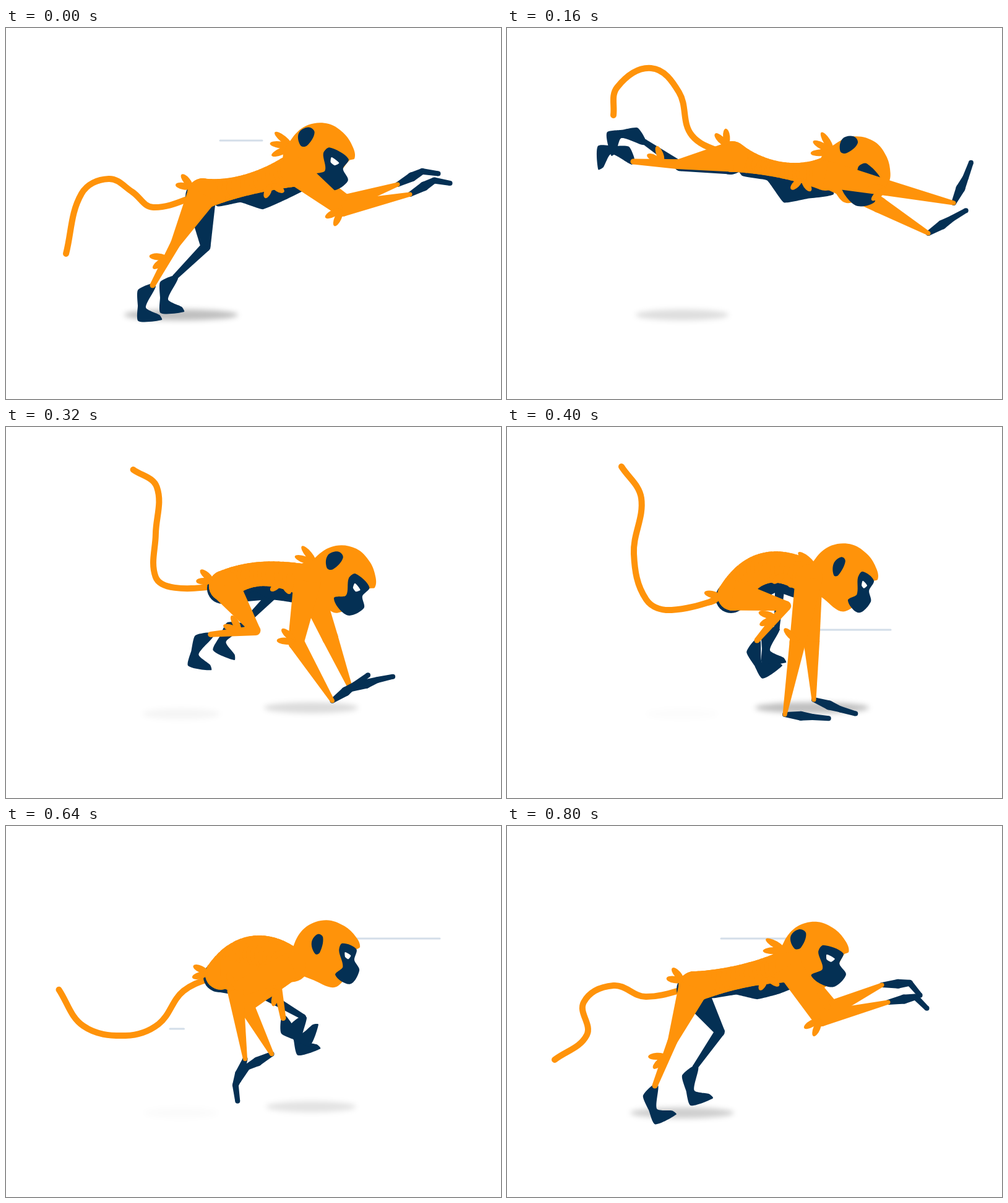
An HTML page with a canvas that plays this animation: 800x600 px, repeating every 0.84 s.

```html
<!DOCTYPE html>
<html lang="en">
<head>
<meta charset="utf-8">
<title>Running monkey</title>
<style>
html, body { margin: 0; width: 100%; height: 100%; overflow: hidden; background: #fff; }
canvas { display: block; }
</style>
</head>
<body>
<canvas id="stage" width="800" height="600"></canvas>
<script>
const ctx = document.getElementById('stage').getContext('2d');
const ORANGE = '#ff930a', NAVY = '#043054', LINE = '#d3dee9';
const LOOP = 840, STEP = 40, RAD = Math.PI / 180;

// Key poses of the rig, one row for each of these times.
const TIMES = [0, 160, 240, 400, 560, 720, 800];
const KEYS = {
  // hip, middle of the back and its radius, chest
  spine: [
    [318,268, 388,254,17, 465,230], [364,208, 440,229,13, 515,236],
    [345,232, 412,243,15, 490,250], [365,272, 418,228,25, 488,244],
    [380,238, 425,207,36, 485,225], [308,248, 375,216,22, 440,228],
    [302,260, 380,243,19, 455,226]],
  // centre, tilt, width of the visible face
  head: [
    [512,194,18,1.12], [573,218,37,1.2], [553,231,39,1.26], [548,229,18.6,.7],
    [543,197,5.6,.6], [493,192,3,.95], [499,195,8.4,1.08]],
  // wrist, palm angle, finger angle
  nearArm: [
    [653,269,-30,10], [722,283,-65,-70], [619,391,-62,-70], [449,465,5,5],
    [359,397,140,100], [456,352,50,50], [616,285,-11,45]],
  farArm: [
    [633,253,-28,8], [681,332,-32,-30], [624,390,-45,-32], [496,441,20,16],
    [419,395,139,95], [474,333,128,128], [606,257,-4,50]],
  // ankle, foot angle
  nearLeg: [
    [237,416,0], [204,216,92], [252,302,65], [404,345,-30],
    [475,284,-40], [384,358,-80], [239,420,-22]],
  farLeg: [
    [273,403,0], [222,184,82], [314,291,58], [436,325,0],
    [486,280,-30], [444,353,5], [304,390,-15]],
  // from the tip towards the hip
  tail: [
    [97,365, 122,268, 166,244, 204,265, 238,290],
    [172,141, 178,96, 233,65, 278,104, 299,174],
    [214,103, 254,100, 278,140, 270,192, 291,214],
    [185,64, 217,115, 205,205, 225,279, 266,296],
    [134,233, 174,292, 234,314, 292,317, 340,298],
    [45,292, 85,335, 142,342, 186,310, 220,239],
    [77,378, 129,338, 124,285, 172,258, 224,276]],
  // opacity of the rear and front shadow
  shade: [[.25,0], [.13,0], [.08,0], [.01,.25], [0,.16], [.06,.06], [.19,0]]
};

// Rigid shapes in their own coordinates.
const SKULL = [-52,0, -34,-28, -3,-40, 27,-32, 47,-15, 54,0, 47,6, 22,65, -18,58, -55,38];
const FACE = [9,8, 15,-4, 46,4, 43,22, 55,38, 37,61, 4,48, 19,34];
const EYE = [22,10, 35,15, 30,21, 23,18];
const EAR = [-13,-2, -1,-16, 11,-11, 6,13, -4,16];
const FOOT = [-24,8, -4,-2, 5,2, -11,36, 11,48, 15,56, -23,58, -24,33];

// Smooth looping interpolation between the key poses.
function pose(rows, t) {
  const n = TIMES.length;
  const at = i => TIMES[(i + n) % n] + LOOP * Math.floor(i / n);
  const row = i => rows[(i + n) % n];
  let i = n - 1;
  while (TIMES[i] > t) i--;
  const h = at(i + 1) - at(i), u = (t - at(i)) / h;
  return row(i).map((a, k) => {
    const b = row(i + 1)[k], d = b - a;
    const ma = (b - row(i - 1)[k]) / (at(i + 1) - at(i - 1)) * h;
    const mb = (row(i + 2)[k] - a) / (at(i + 2) - at(i)) * h;
    return a + u * (ma + u * (3 * d - 2 * ma - mb + u * (ma + mb - 2 * d)));
  });
}

const polar = ([x, y], deg, len) =>
  [x + Math.cos(deg * RAD) * len, y + Math.sin(deg * RAD) * len];
const angle = (a, b) => Math.atan2(b[1] - a[1], b[0] - a[0]) / RAD;
const mix = (a, b, u) => a.map((v, i) => v + (b[i] - v) * u);

// Curve through the points.
function trace(xy, smooth, closed) {
  const n = xy.length / 2;
  const pt = i => {
    i = closed ? (i + n) % n : Math.min(n - 1, Math.max(0, i));
    return [xy[2 * i], xy[2 * i + 1]];
  };
  ctx.beginPath();
  ctx.moveTo(...pt(0));
  for (let i = 0; i < (closed ? n : n - 1); i++) {
    const a = pt(i), b = pt(i + 1);
    const k = Math.hypot(b[0] - a[0], b[1] - a[1]) * smooth * .36;
    ctx.bezierCurveTo(...polar(a, angle(pt(i - 1), b), k),
      ...polar(b, angle(a, pt(i + 2)), -k), ...b);
  }
}

function shape(xy, color, smooth) {
  trace(xy, smooth, true);
  ctx.fillStyle = color;
  ctx.fill();
}

// Tapered strokes through [x, y, radius] points.
function chain(points, color) {
  ctx.fillStyle = color;
  points.forEach((p, i) => {
    ctx.beginPath();
    ctx.arc(...p, 0, 2 * Math.PI);
    ctx.fill();
    if (!i) return;
    const q = points[i - 1], side = angle(q, p) + 90;
    ctx.beginPath();
    ctx.moveTo(...polar(q, side, q[2]));
    ctx.lineTo(...polar(p, side, p[2]));
    ctx.lineTo(...polar(p, side, -p[2]));
    ctx.lineTo(...polar(q, side, -q[2]));
    ctx.fill();
  });
}

// Elbow or knee between two ends; side picks the bend.
function joint(a, b, upper, lower, side) {
  const d = Math.hypot(b[0] - a[0], b[1] - a[1]);
  if (d >= upper + lower) return mix(a, b, upper / (upper + lower));
  const along = (upper * upper - lower * lower + d * d) / (2 * d);
  const off = Math.sqrt(Math.max(0, upper * upper - along * along));
  return polar(polar(a, angle(a, b), along), angle(a, b) + 90 * side, off);
}

function tuft(base, deg, leaves, spread, len) {
  ctx.fillStyle = ORANGE;
  for (let i = 0; i < leaves; i++) {
    const a = deg + spread * (1 - 2 * i / (leaves - 1));
    ctx.beginPath();
    ctx.ellipse(...polar(base, a, len * .53), len * .47, 5.6, a * RAD, 0, 2 * Math.PI);
    ctx.fill();
  }
}

function arm(chest, key, upper, lower) {
  const wrist = key.slice(0, 2), [palm, finger] = key.slice(2);
  const elbow = joint(chest, wrist, upper, lower, 1);
  const knuckle = polar(wrist, palm, 45);
  chain([[...wrist, 4], [...polar(wrist, palm, 26), 7.5], [...knuckle, 5],
    [...polar(knuckle, finger, 26), 4]], NAVY);
  chain([[...chest, 22], [...elbow, 13], [...wrist, 3.5]], ORANGE);
  return angle(elbow, wrist) + 145 && { elbow, wrist };
}

function leg(hip, key, upper, lower, color) {
  const ankle = key.slice(0, 2);
  const knee = joint(hip, ankle, upper, lower, -1);
  ctx.save();
  ctx.translate(...ankle);
  ctx.rotate(key[2] * RAD);
  shape(FOOT, NAVY, .5);
  ctx.restore();
  chain([[...hip, 25], [...knee, 8], [...ankle, 4.5]], color);
  return { knee, ankle };
}

function drawHead([x, y, tilt, turn]) {
  const swing = xy => xy.map((v, i) => i % 2 ? v : 55 - (55 - v) * turn);
  ctx.save();
  ctx.translate(x, y);
  ctx.rotate(tilt * RAD);
  tuft([-47, 13], 170, 3, 31, 37);
  shape(SKULL, ORANGE, .95);
  shape(swing(FACE), NAVY, .75);
  shape(swing(EYE), '#fff', .4);
  ctx.translate(19 - 45 * turn, 16 - 22 * turn);
  ctx.scale(Math.min(1, turn), 1);
  shape(EAR, NAVY, .9);
  ctx.restore();
}

function shadow(alpha, x, y) {
  if (alpha < .004) return;
  ctx.save();
  ctx.filter = 'blur(4px)';
  ctx.fillStyle = `rgba(0,0,0,${alpha})`;
  ctx.beginPath();
  ctx.ellipse(x, y, 57 + 140 * alpha, 9, 0, 0, 2 * Math.PI);
  ctx.fill();
  ctx.restore();
}

// A line that grows in from the right end and shrinks away at the left end.
function speedLine(t, start, left, y) {
  const right = left + 357, age = (t - start + LOOP) % LOOP;
  const a = Math.max(left, right - 1.62 * age);
  const b = Math.min(right, right - 1.75 * (age - 130));
  if (b <= a) return;
  ctx.strokeStyle = LINE;
  ctx.lineWidth = 3;
  ctx.beginPath();
  ctx.moveTo(a + 1, y);
  ctx.lineTo(b - 1, y);
  ctx.stroke();
}

function draw(t) {
  const now = name => pose(KEYS[name], t);
  const s = now('spine');
  const hip = s.slice(0, 2), mid = s.slice(2, 4), chest = s.slice(5);
  const [rear, front] = now('shade');

  // Point with radius on the bent back, and a place below it.
  const ends = [[...hip, 25], [...mid, s[4]], [...chest, 27]];
  const back = u => ends[0].map((a, i) => {
    const m = ends[1][i], b = ends[2][i];
    return a + (b - a) * u + 2 * (2 * m - a - b) * u * (1 - u);
  });
  const down = u => angle(back(u - .05), back(u + .05)) + 90;
  const below = (u, d) => polar(back(u), down(u), d);

  ctx.fillStyle = '#fff';
  ctx.fillRect(0, 0, 800, 600);
  ctx.lineCap = 'round';
  shadow(rear, 283, 464);
  shadow(front, 493, 454);
  speedLine(t, 546, 345, 182);
  speedLine(t, 320, 264, 328);

  trace([...now('tail'), ...hip], 1, false);
  ctx.strokeStyle = ORANGE;
  ctx.lineWidth = 10;
  ctx.stroke();

  leg([hip[0] - 3, hip[1] + 4], now('farLeg'), 82, 70, NAVY);
  shape([hip, below(.15, 24), below(.4, s[4] + 8), below(.6, 72 - 1.6 * s[4]),
    below(.82, 41), below(1.08, 33), chest].flat(), NAVY, .3);
  arm(chest, now('farArm'), 98, 90);
  chain(Array.from({ length: 21 }, (_, i) => back(i / 20)), ORANGE);

  const { knee, ankle } = leg(hip, now('nearLeg'), 88, 73, ORANGE);
  const rump = angle(hip, mid) * 1.3 - 135;
  tuft(polar(hip, rump, 19), rump, 2, 20, 28);
  tuft(mix(knee, ankle, .33), angle(knee, ankle) + 45, 2, 20, 30);

  drawHead(now('head'));
  tuft(below(.75, 9), down(.75), 2, 40, 25);
  const { elbow, wrist } = arm(chest, now('nearArm'), 100, 112);
  tuft(elbow, angle(elbow, wrist) + 145, 2, 19, 31);
}

const begin = performance.now();
function tick() {
  const t = (performance.now() - begin) % LOOP;
  draw(Math.floor(t / STEP) * STEP);
  requestAnimationFrame(tick);
}
tick();
</script>
</body>
</html>
```
